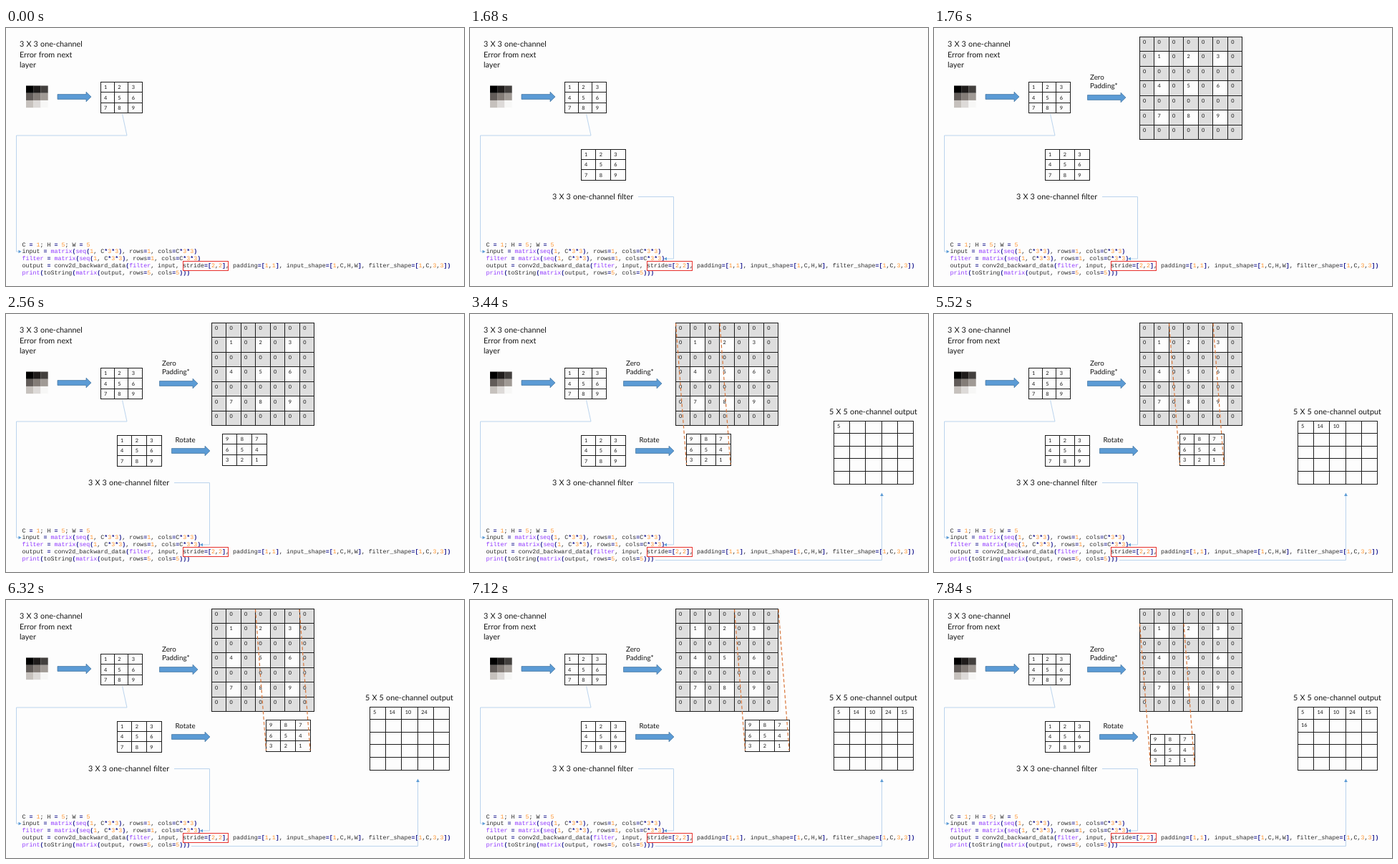
Animation, 640 px wide and 360 px high, one loop 8000 ms. Source, as an HTML page:

```html
<!DOCTYPE html>
<html lang="en">
<head>
<meta charset="utf-8">
<title>Convolution backward pass</title>
<style>
html, body { margin: 0; width: 100%; height: 100%; overflow: hidden; background: #fdfdfd; }
svg { display: block; width: 640px; height: 360px; }
text { font-family: Lato, Carlito, sans-serif; fill: #151515; text-rendering: geometricPrecision; }
.label { font-size: 10.8px; word-spacing: .4px; }
.small { font-size: 9.8px; }
.digit { font-size: 7.3px; }
.code { font: 8.32px "Liberation Mono", "Courier New", monospace; white-space: pre; fill: #2a2a2a; }
.op { fill: #1a1a90; font-weight: bold; }
.num { fill: #ff9633; }
.fn { fill: #9038ff; }
.grid { fill: none; stroke: #1c1c1c; }
.wire { fill: none; stroke: #b4d0eb; stroke-width: .9; }
.tip { fill: #5b9bd5; }
.arrow { fill: #5b9bd5; stroke: #41719c; stroke-width: .7; }
.dash { fill: none; stroke: #d9763a; stroke-width: 1.2; stroke-dasharray: 4.5 3; }

/* hard cuts on an 8 s loop */
.cut { animation: 8s step-end infinite; }
@keyframes at12 { 0% { visibility: hidden } 12%, to { visibility: visible } }
@keyframes at22 { 0% { visibility: hidden } 22%, to { visibility: visible } }
@keyframes at32 { 0% { visibility: hidden } 32%, to { visibility: visible } }
@keyframes at43 { 0% { visibility: hidden } 43%, to { visibility: visible } }
@keyframes at53 { 0% { visibility: hidden } 53%, to { visibility: visible } }
@keyframes at63 { 0% { visibility: hidden } 63%, to { visibility: visible } }
@keyframes at73 { 0% { visibility: hidden } 73%, to { visibility: visible } }
@keyframes at83 { 0% { visibility: hidden } 83%, to { visibility: visible } }
@keyframes at94 { 0% { visibility: hidden } 94%, to { visibility: visible } }
#scan { animation: scan 8s step-end infinite; }
@keyframes scan {
  0% { transform: translate(0, 0) }
  53% { transform: translate(20px, 0) }
  63% { transform: translate(41px, 0) }
  73% { transform: translate(61px, 0) }
  83% { transform: translate(82px, 0) }
  94%, to { transform: translate(0, 20px) }
}
</style>
</head>
<body>
<svg id="stage" viewBox="0 0 640 360"></svg>
<script>
const text = (x, y, s, cls) => `<text x="${x}" y="${y}" class="${cls}">${s}</text>`;
const path = (d, cls) => `<path d="${d}" class="${cls}"/>`;
const rect = (x, y, w, h, fill) => `<rect x="${x}" y="${y}" width="${w}" height="${h}" fill="${fill}"/>`;
const cut = (pct, ...parts) =>
  `<g class="cut" style="animation-name:at${pct}">${parts.join("")}</g>`;

const digit = (x, y, s) => text(x + 5, y + 9.9, s, "digit");
const snap = v => Math.floor(v) + .5;

// n-by-n table with digits set from the top left of each cell
function table(x, y, w, h, n, values) {
  const cw = w / n, ch = h / n;
  const right = snap(x + w) + .5, bottom = snap(y + h) + .5;
  let d = "", out = "";
  for (let i = 0; i <= n; i++) {
    d += `M${snap(x + i * cw)} ${y}V${bottom}M${x} ${snap(y + i * ch)}H${right}`;
  }
  values.forEach((v, i) => {
    out += digit(x + i % n * cw, y + Math.floor(i / n) * ch, v);
  });
  return path(d, "grid") + out;
}

// block arrow, 14 px tall, centred on y
const arrow = (x, y, len) =>
  path(`M${x} ${y - 3.4}H${x + len - 7}V${y - 6.8}L${x + len} ${y}L${x + len - 7} ${y + 6.8}V${y + 3.4}H${x}Z`, "arrow");

function codeLine(s, i) {
  const html = s.replace(/\b(?:matrix|seq|filter|print)\b|\b\d+\b|[=*()[\]]/g, t => {
    const cls = /\d/.test(t) ? "num" : /\w/.test(t) ? "fn" : "op";
    return `<tspan class="${cls}">${t}</tspan>`;
  });
  return text(22.5, 304.5 + i * 9.8, html, "code");
}

const code = [
  "C = 1; H = 5; W = 5",
  "input = matrix(seq(1, C*3*3), rows=1, cols=C*3*3)",
  "filter = matrix(seq(1, C*3*3), rows=1, cols=C*3*3)",
  "output = conv2d_backward_data(filter, input, stride=[2,2], padding=[1,1], input_shape=[1,C,H,W], filter_shape=[1,C,3,3])",
  "print(toString(matrix(output, rows=5, cols=5)))"
];
const seq = [1, 2, 3, 4, 5, 6, 7, 8, 9];
const shades = ["#000", "#1f1c1b", "#423f3d", "#625c59", "#837c77", "#a09a95", "#c6c1bd", "#dddad8", "#f7f7f6"];

// 7-by-7 matrix: values on odd rows and columns, zeros elsewhere
const padded = Array.from({ length: 49 }, (_, i) => {
  const r = Math.floor(i / 7), c = i % 7;
  return r % 2 && c % 2 ? (r - 1) / 2 * 3 + (c + 1) / 2 : 0;
});
const cell = 143.7 / 7;
const holes = padded.map((v, i) => v
  ? rect(287 + i % 7 * cell, 12 + Math.floor(i / 7) * cell, cell, cell, "#fdfdfd") : "").join("");

const results = [[53, 14], [63, 10], [73, 24], [83, 15], [94, 16]];

document.getElementById("stage").innerHTML = [
  text(19, 26, "3 X 3 one-channel", "label"),
  text(19, 40.6, "Error from next", "label"),
  text(19, 55.2, "layer", "label"),
  shades.map((c, i) => rect(28 + i % 3 * 10.2, 80.5 + Math.floor(i / 3) * 10.2, 10.3, 10.3, c)).join(""),
  arrow(72, 96, 47),
  table(132, 75, 58, 43.8, 3, seq),
  path("M162.5 120L169 150H14.5V312H18", "wire"),
  path("M17.5 309.8L21.5 312L17.5 314.2Z", "tip"),
  code.map(codeLine).join(""),
  '<rect x="247.5" y="325.5" width="63" height="13" fill="none" stroke="#e8302c"/>',

  cut(12,
    table(155, 169, 62, 43.4, 3, seq),
    text(115, 239, "3 X 3 one-channel filter", "label"),
    path("M235 235.5H284.5V322H274", "wire"),
    path("M275 319.8L271 322L275 324.2Z", "tip")),

  cut(22,
    text(218, 72, "Zero", "small"),
    text(218, 84.4, "Padding*", "small"),
    arrow(214.5, 97, 53.5),
    rect(287, 12, 143.7, 143.7, "#dedede"), holes,
    table(287, 12, 143.7, 143.7, 7, padded)),

  cut(32, text(236.5, 179, "Rotate", "small"), arrow(231.5, 191, 53.5)),

  '<g id="scan">',
  cut(32, table(302, 167, 62, 44, 3, [...seq].reverse())),
  cut(43, path("M287.5 13L302.5 210M349 13L364 210", "dash")),
  "</g>",

  cut(43,
    text(502, 140, "5 X 5 one-channel output", "label"),
    table(508, 149, 111.9, 88, 5, [5]),
    path("M259 343.5H575.5V253", "wire"),
    path("M573.2 254L575.5 249.5L577.8 254Z", "tip")),

  results.map(([pct, v], i) => {
    const k = i + 1;
    return cut(pct, digit(508 + k % 5 * 22.4, 149 + Math.floor(k / 5) * 17.6, v));
  }).join("")
].join("");
</script>
</body>
</html>
```
